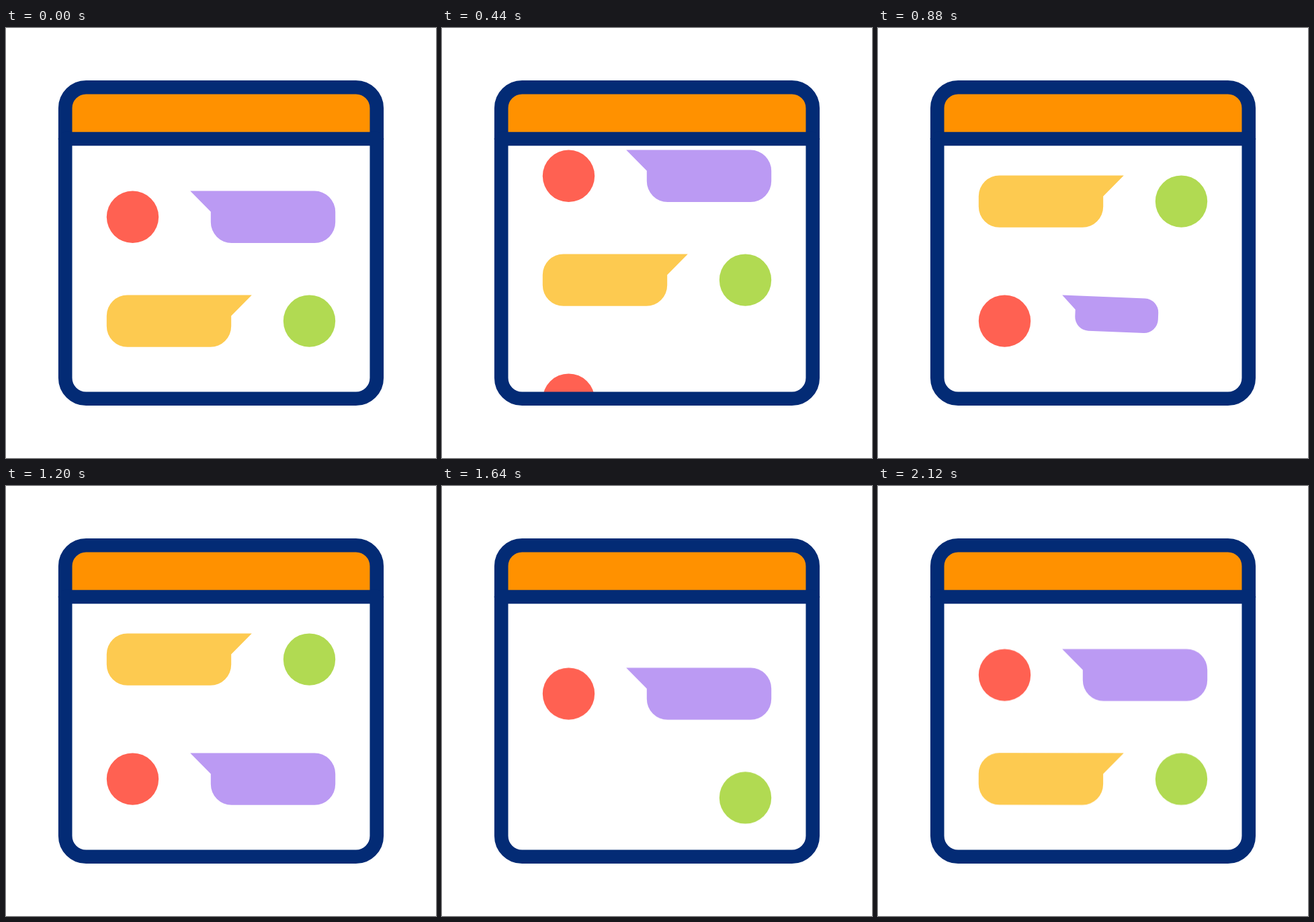
These frames come from a looping animation (640x640 px, 2.28 s). An HTML page:

```html
<!DOCTYPE html>
<html lang="en">
<head>
<meta charset="utf-8">
<title>Chat window</title>
<style>
  html, body { margin: 0; width: 100%; height: 100%; overflow: hidden; background: #fff; }
  svg { display: block; width: 100%; height: 100%; }

  .red { fill: #ff6152; }
  .green { fill: #b1da52; }
  .purple { fill: #bb9af3; }
  .yellow { fill: #fdca50; }
  .header { fill: #ff9100; }
  .frame { fill: none; stroke: #032b75; stroke-width: 20.6; }

  .rows { animation: scroll 2280ms infinite cubic-bezier(.64, 0, .36, 1); }
  .pop { animation: pop 2280ms infinite cubic-bezier(.333, 0, .667, 1); }
  /* Same pop, 960 ms later; until then its row is below the window. */
  .late { animation-delay: -1320ms; }

  @keyframes scroll {
    0%, 5.92% { transform: translateY(0); }
    36.4%, 52.28% { transform: translateY(-178px); }
    82.76%, 100% { transform: translateY(-332.8px); }
  }

  /* Grow from the tail tip while swinging around it. */
  @keyframes pop {
    0%, 32.46% { scale: 0; rotate: 0deg; }
    41.23% { rotate: 3deg; }
    42.54% { scale: 1; }
    45.61% { rotate: -5deg; }
    51.32%, 100% { scale: 1; rotate: 0deg; }
  }
</style>
</head>
<body>
<svg viewBox="0 0 640 640">
  <defs>
    <path id="bubble" d="M0 0H185a31 31 0 0 1 31 31v15.4a31 31 0 0 1-31 31H61.6a31 31 0 0 1-31-31V31Z"/>
    <circle id="avatar" cy="38.7" r="38.7"/>
    <clipPath id="window"><rect x="88" y="165" width="464" height="387"/></clipPath>
  </defs>

  <g clip-path="url(#window)">
    <g class="rows">
      <g transform="translate(0 242.6)">
        <use href="#avatar" x="188.5" class="red"/>
        <use href="#bubble" x="274.2" class="purple"/>
      </g>
      <g transform="translate(0 397.4)">
        <g transform="translate(365.8) scale(-1 1)"><use href="#bubble" class="yellow"/></g>
        <use href="#avatar" x="451.5" class="green"/>
      </g>
      <g transform="translate(0 575.4)">
        <use href="#avatar" x="188.5" class="red"/>
        <g transform="translate(274.2)"><g class="pop"><use href="#bubble" class="purple"/></g></g>
      </g>
      <g transform="translate(0 730.2)">
        <g transform="translate(365.8) scale(-1 1)"><g class="pop late"><use href="#bubble" class="yellow"/></g></g>
        <use href="#avatar" x="451.5" class="green"/>
      </g>
    </g>
  </g>

  <path class="header" d="M88.2 165V119a31 31 0 0 1 31-31H520.8a31 31 0 0 1 31 31V165Z"/>
  <rect class="frame" x="88.2" y="88.2" width="463.6" height="463.6" rx="31"/>
  <path class="frame" d="M88 165H552" stroke-linecap="round"/>
</svg>
</body>
</html>
```
